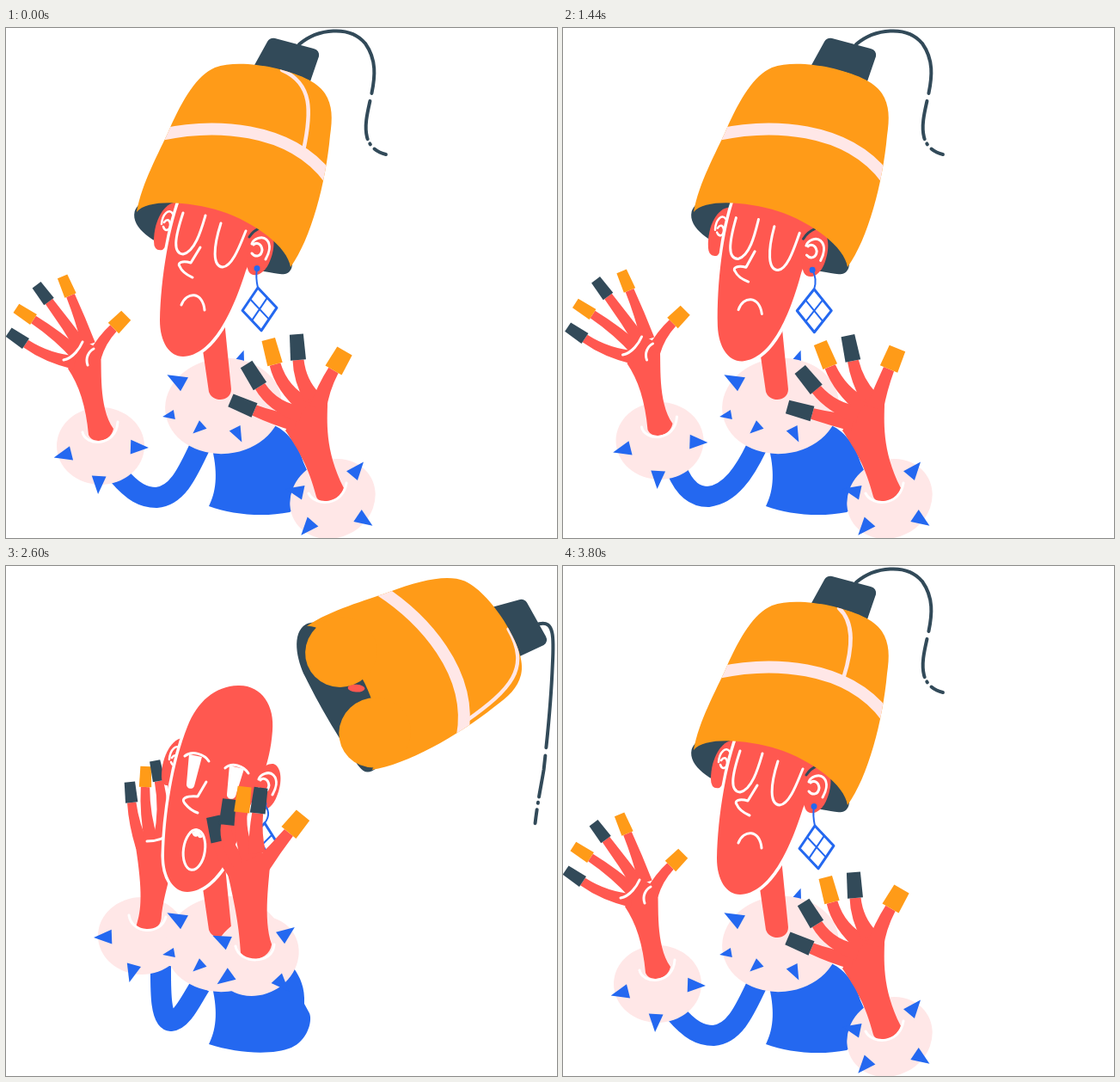
Recreate the animation shown at these times as an HTML page with a canvas. Size 641x593 px, loop 3840 ms.

```html
<!DOCTYPE html>
<html lang="en">
<head>
<meta charset="utf-8">
<title>Hat off</title>
<style>
  html, body { margin: 0; width: 100%; height: 100%; overflow: hidden; background: #fff; }
  canvas { display: block; }
</style>
</head>
<body>
<canvas id="stage" width="641" height="593"></canvas>
<script>
const c = document.getElementById('stage').getContext('2d');
const LOOP = 3840, RAD = Math.PI / 180;
const RED = '#ff5850', ORANGE = '#ff9b18', NAVY = '#324a59', BLUE = '#2468f0', PINK = '#ffe7e7', WHITE = '#fff';
const TILT = 46 * RAD, BRIM = 0.344;

const clamp = u => Math.max(0, Math.min(1, u));
const lerp = (a, b, u) => a + (b - a) * u;
const ramp = (t, a, b) => (1 - Math.cos(Math.PI * clamp((t - a) / (b - a)))) / 2;

// Blend two path strings of the same structure.
function mix(a, b, u) {
  const to = b.match(/-?[\d.]+/g);
  let i = 0;
  return a.replace(/-?[\d.]+/g, n => lerp(+n, +to[i++], u).toFixed(2));
}

function fill(d, color) {
  c.fillStyle = color;
  c.fill(new Path2D(d));
}

function line(d, color, width = 3, cap = 'round') {
  c.strokeStyle = color;
  c.lineWidth = width;
  c.lineCap = cap;
  c.lineJoin = 'round';
  c.stroke(new Path2D(d));
}

function oval(x, y, rx, ry, color, rot = 0) {
  c.fillStyle = color;
  c.beginPath();
  c.ellipse(x, y, rx, ry, rot, 0, 7);
  c.fill();
}

function group(draw) {
  c.save();
  draw();
  c.restore();
}

// A triangle that points outward at the given angle, tip at radius r.
function spike(deg, r, size) {
  group(() => {
    c.rotate(deg * RAD);
    c.translate(r, 0);
    fill(`M0 0 L${-size} ${-size * 0.4} L${-size} ${size * 0.4}Z`, BLUE);
  });
}

// Each finger is [x, y, angle] at the foot of its cap; the thumb comes last.
const left = {
  size: 0.8, colors: [NAVY, ORANGE, NAVY, ORANGE, ORANGE],
  rest: {
    fingers: [[23, 367, -146], [32, 339, -147], [50, 318, -127], [75, 311, -113], [125, 349, -45]],
    knuckles: [[80, 389], [96, 368], [103, 382]],
    palm: 'M96 473 C93 440 85 415 72 396 L95 366 L110 374 C112 395 107 440 125 466 C122 482 100 484 96 473 Z',
    lines: 'M67 386 C78 384 86 372 89 365 M95 392 C92 384 96 376 102 373 M89 470 C92 486 128 488 130 458'
  },
  up: {
    fingers: [[148, 275, -95], [164, 257, -88], [180, 250, -101], [195, 253, -100], [206, 302, -70]],
    knuckles: [[160, 326], [192, 310], [192, 330]],
    palm: 'M152 418 C158 400 160 380 152 325 L192 305 L202 312 C204 330 184 375 181 410 C179 426 156 428 152 418 Z',
    lines: 'M164 320 C178 320 188 314 193 309 M188 337 C189 330 193 326 198 325 M143 406 C146 428 180 430 186 408'
  }
};

const right = {
  size: 1, colors: [NAVY, NAVY, ORANGE, NAVY, ORANGE],
  rest: {
    fingers: [[289, 444.5, -157], [295.5, 416.5, -122], [313, 391, -105], [340, 386, -94], [381, 398, -60]],
    knuckles: [[337, 459], [356, 430], [363, 442]],
    palm: 'M361 545 C352 510 340 490 325 468 L353 424 L374 436 C374 455 370 490 393 535 C390 553 365 556 361 545 Z',
    lines: 'M352 541 C360 557 392 556 396 529'
  },
  up: {
    fingers: [[246, 320.5, -103], [255, 301, -84], [272.5, 286.5, -84], [291, 287.5, -83], [327.5, 310, -51]],
    knuckles: [[266, 355], [291, 334], [297, 348]],
    palm: 'M273 450 C271 420 266 395 257 358 L290 325 L306 345 C306 362 298 410 309 440 C306 460 278 462 273 450 Z',
    lines: 'M267 442 C271 463 311 464 312 440'
  }
};

// A tapered finger bending from its knuckle into the direction of its cap.
function finger(bx, by, x, y, a, size, color, thumb) {
  const dx = Math.cos(a), dy = Math.sin(a), bend = Math.hypot(x - bx, y - by) / 2;
  const mx = x - dx * bend, my = y - dy * bend;
  const ba = Math.atan2(my - by, mx - bx), nx = -Math.sin(ba), ny = Math.cos(ba);
  const foot = 10 * size, mid = 7.5 * size, tip = 6.5 * size;
  fill(`M${bx + nx * foot} ${by + ny * foot} Q${mx - dy * mid} ${my + dx * mid} ${x - dy * tip} ${y + dx * tip}
    L${x + dy * tip} ${y - dx * tip} Q${mx + dy * mid} ${my - dx * mid} ${bx - nx * foot} ${by - ny * foot}Z`, RED);
  const len = (thumb ? 26 : 30) * size, half = (thumb ? 11 : 9) * size;
  group(() => {
    c.translate(x, y);
    c.rotate(a);
    fill(`M0 ${-half} L${len} ${1 - half} L${len} ${half - 1} L0 ${half}Z`, color);
  });
}

function hand({ size, colors, rest, up }, h, fan, sway) {
  const knuckles = rest.knuckles.map((k, i) => k.map((v, j) => lerp(v, up.knuckles[i][j], h)));
  const [first, last, thumb] = knuckles;
  group(() => {
    c.transform(1, 0, -sway / 180, 1, 2.5 * sway, 0);
    fill(mix(rest.palm, up.palm, h), RED);
    rest.fingers.forEach((f, i) => {
      let [x, y, a] = f.map((v, j) => lerp(v, up.fingers[i][j], h));
      const [bx, by] = i === 4 ? thumb : [0, 1].map(j => lerp(first[j], last[j], i / 3));
      const px = x - last[0], py = y - last[1], turn = -0.06 * fan;
      x += px * (Math.cos(turn) - 1) - py * Math.sin(turn);
      y += px * Math.sin(turn) + py * (Math.cos(turn) - 1);
      finger(bx, by, x, y, a * RAD + 2.2 * turn, size, colors[i], i === 4);
    });
  });
  line(mix(rest.lines, up.lines, h), WHITE);
}

function cuff(x, y, rot, lean, angles) {
  group(() => {
    c.translate(x, y);
    oval(0, 0, 51, 45, PINK, lean);
    c.rotate(rot);
    angles.forEach(a => spike(a, 56, 21));
  });
}

function leftSide({ h, w, sway }) {
  const dx = 2.5 * w, dy = -6 * w;
  cuff(110 + 48 * h + dx, 486 - 56 * h + dy, 0.21 * h, 0, [166, 93, 2]);
  group(() => {
    c.translate(dx, dy);
    hand(left, h, 0, -sway);
  });
}

function rightSide({ h, w, sway }) {
  cuff(380 - 89 * h, 547.5 - 94 * h, 0.23 * h, -0.5, [-50, 34, 131, 192]);
  hand(right, h, Math.min(1, 1.4 * w) * (1 - h), sway);
}

function torso({ h, w }) {
  const sunk = mix('M130 519 C148 540 160 546 175 546 C200 544 212 515 225 488',
    'M132 513 C142 538 155 545 169 545 C195 542 212 515 225 488', w);
  line(mix(sunk, 'M180 465 C180 490 179 528 192 529 C205 528 215 505 226 488', h), BLUE, 24, 'butt');
  fill(mix('M240 490 C247 520 244 540 236 556 C262 566 300 569 330 563 C345 555 352 530 350 514 L346 505 C342 490 330 470 312 462 Z',
    'M240 490 C247 520 244 540 236 556 C270 567 310 569 332 560 C350 552 357 530 353 520 L347 509 C348 490 342 478 335 468 Z', h), BLUE);
}

function collar() {
  group(() => {
    c.translate(253, 439.5);
    spike(-70, 69, 14);
    oval(0, 0, 68, 55.5, PINK, -0.1);
    spike(209, 75, 23);
    spike(170, 72, 14);
    spike(138, 48, 16);
    spike(63, 47, 18);
  });
}

const SKULL = 'M265 142 C292 141 308 165 305 195 C302 235 288 262 279 282 C264 330 240 381 206 382 C190 382 179 365 179 340 C180 290 190 230 206 190 C218 160 238 143 265 142 Z';

function inHead(s, draw, shift = 0) {
  group(() => {
    c.translate(218 + s.hx + shift, 320 + s.hy);
    c.rotate(s.turn);
    c.translate(-218, -320);
    draw();
  });
}

function leftEar() {
  fill('M200 203 C186 201 172 222 172 248 Q172 260 182 258 L200 240 Z', RED);
  line('M181 228 C182 216 190 209 194 216 M183 231 C185 237 191 236 191 228 C190 221 186 223 184 226', WHITE, 2.5);
}

function rightEar(s) {
  if (s.h < 0.2) line('M283 243 Q288 235 297 232', NAVY);
  fill('M282 262 C282 245 292 232 303 233 C313 236 314 255 307 271 C302 284 292 290 285 286 C279 282 280 270 282 262 Z', RED);
  line('M286 251 C288 245 298 241 303 246 C309 252 306 262 302 269 M286 262 C290 267 297 266 298 258 C297 250 291 249 288 252', WHITE);
  oval(292, 279.5, 3.5, 3.5, BLUE);
  line(`M292 280 Q${295 + 60 * s.swing} 290 293 302`, BLUE, 2);
  group(() => {
    c.translate(293, 302);
    c.rotate(s.swing);
    line('M0 0 L20 25 L0 50 L-20 25Z', BLUE);
    line('M-10 12.5 L10 37.5 M10 12.5 L-10 37.5', BLUE, 2);
  });
}

function face(open) {
  line(SKULL, WHITE, 7);
  fill(SKULL, RED);
  if (!open) {
    line('M206 215 C196 245 194 262 206 263 C220 260 227 235 232 218 M250 227 C241 255 240 277 252 278 C264 277 273 250 279 236', WHITE);
    line('M226 255 L215 273 C205 270 199 273 202 277 C204 282 210 287 217 290 M204 322 C210 306 229 306 231 328', WHITE);
    return;
  }
  line('M203 224 C212 217 226 222 231 230 M250 238 C258 231 271 235 277 244', WHITE);
  fill('M208 222 L223 225 L214 259 C212 264 205 262 205 257 Z M255 235 L272 239 L262 271 C259 276 252 274 252 269 Z', WHITE);
  line('M228 254 L218 271 C205 270 198 273 203 279 C207 284 212 288 218 290', WHITE);
  c.beginPath();
  c.ellipse(214, 333, 12.5, 23.5, 0.14, 0, 7);
  c.stroke();
  fill('M211 313 L218 309 L224 318 Q220 321 218 317 Q214 320 211 313Z', WHITE);
}

const HAT = 'M152 214 C158 180 178 145 190 118 C206 82 222 55 243 46 C262 39 290 42 310 46 C340 53 362 62 371 76 C380 90 380 105 377 125 C372 180 355 245 331 278 C328 255 290 226 250 213 C215 202 165 198 152 214 Z';

function toHat(s) {
  c.translate(241 + 146.5 * s.h, 246 - 93 * s.h);
}

// Draws in the upright hat's place; the crown narrows a little as it tips over.
function inHat(s, draw) {
  group(() => {
    toHat(s);
    c.rotate(TILT * s.h + BRIM);
    c.scale(1 - 0.035 * s.h, 1);
    c.rotate(-BRIM);
    c.translate(-241, -246);
    draw();
  });
}

function opening() {
  c.translate(241, 246);
  c.rotate(BRIM);
  fill('M-97 0 C-95 20 -62 27 -40 26 C-5 25 45 20 68 15 C85 12 97 12 97 0 C97 -53 -97 -53 -97 0Z', NAVY);
}

function hair(s) {
  if (s.hair < 0.02) return;
  group(() => {
    toHat(s);
    c.scale(s.hair, s.hair);
    c.translate(-388, -152);
    fill('M348 72 C320 86 255 98 238 134 C231 144 230 152 235 153 C241 147 249 140 259 139 C258 156 278 155 286 151 C286 165 300 172 318 167 C316 180 322 188 336 190 L332 206 Q337 210 343 209 L384 193 L410 224 L430 236 L430 180 Z', NAVY);
    line('M258 137 Q275 117 302 113 M309 121 Q335 119 350 101 M386 158 Q405 166 422 154 M413 147 L418 143', WHITE);
  });
}

function cord(s) {
  const rest = 'M0 0 C21 -18 59 -23 77 -1 C103 36 71 76 79 108 C82 119 91 126 101 128';
  const out = 'M0 0 C20 -3 19 20 16 55 C13 90 7 130 -1 165 C-7 190 -14 210 -19 240';
  const hang = 'M0 0 C15 -6 15 12 15 38 C15 90 14 120 13 175 C12 195 11 210 10 245';
  const a = TILT * s.h, cos = Math.cos(a), sin = Math.sin(a);
  group(() => {
    toHat(s);
    c.translate(100 * cos + 227 * sin, 100 * sin - 227 * cos);
    c.setLineDash([145, 9, 45, 6, 1, 7, 15, 999].map(d => d * (1 + 0.07 * s.h)));
    line(mix(rest, mix(out, hang, s.hang), s.h), NAVY, 4);
  });
}

// The thin seam slides round the crown with the spin angle.
function seam(deg) {
  const x = Math.sin(deg * RAD);
  if (Math.cos(deg * RAD) < 0) return;
  const ex = 289 + 82 * x, ey = 120 + 45 * Math.max(0, x) * x;
  line(`M321 49 C${308 + 70 * x} ${70 - 8 * Math.abs(x)} ${300 + 80 * x} 97 ${ex} ${ey}`, PINK, 4.5);
}

function hat(s) {
  cord(s);
  inHat(s, () => {
    fill('M288 45 L304 16 Q307 11 313 12 L358 24 Q365 26 364 33 L354 62 Q320 45 288 45 Z', NAVY);
    fill(HAT, ORANGE);
    const p = s.lips;
    if (p > 0.4) oval(247, 224, 10, 4.5, RED, -0.72);
    if (p > 0.02) {
      oval(203 + 14 * (1 - p), 207 - 40 * (1 - p), 42 * p, 42 * p, ORANGE);
      oval(301, 245 - 50 * (1 - p), 42 * p, 42 * p, ORANGE);
    }
    c.clip(new Path2D(HAT));
    line('M180 124 C240 111 330 113 376 175', PINK, 14);
    seam(s.spin);
  });
}

function spinAt(t) {
  const turns = [[0, 44], [1440, 250], [2000, 363], [2600, 430], [3320, 540], [LOOP, 764]];
  const i = turns.findIndex(k => t < k[0]);
  const [a, b] = [turns[i - 1], turns[i]];
  return lerp(a[1], b[1], (t - a[0]) / (b[0] - a[0]));
}

function state(t) {
  const h = ramp(t, 1600, 1920) - ramp(t, 3320, 3640);
  const w = Math.sin(clamp(t / 1440) * Math.PI / 2) * (1 - ramp(t, 1600, 1900));
  const recoil = h * Math.exp(-Math.max(0, t - 1900) / 470);
  const beat = 2 * Math.PI * t / (LOOP / 2);
  return {
    h, w,
    hx: 22 * recoil,
    hy: 5 * w - 13.5 * recoil,
    turn: -0.044 * w,
    swing: 0.04 - 0.12 * Math.cos(beat),
    sway: 2 * h * Math.sin(beat - 2 * Math.PI * 2000 / (LOOP / 2)),
    hair: ramp(t, 1680, 1860) - ramp(t, 2060, 2240),
    lips: ramp(t, 2240, 2380) - ramp(t, 2920, 3080),
    hang: clamp((t - 2000) / 1320),
    spin: spinAt(t)
  };
}

function frame(now) {
  const s = state(now % LOOP);
  c.fillStyle = WHITE;
  c.fillRect(0, 0, 641, 593);
  torso(s);
  inHat(s, opening);
  leftSide(s);
  inHead(s, leftEar, 4 * s.h);
  collar();
  fill('M228 368 L236 423 C240 436 262 435 262 420 L254 340 Z', RED);
  inHead(s, () => face(s.h > 0.4));
  inHead(s, () => rightEar(s), 3 * s.h);
  hair(s);
  hat(s);
  rightSide(s);
}

function tick() {
  frame(performance.now());
  requestAnimationFrame(tick);
}
tick();
</script>
</body>
</html>
```
